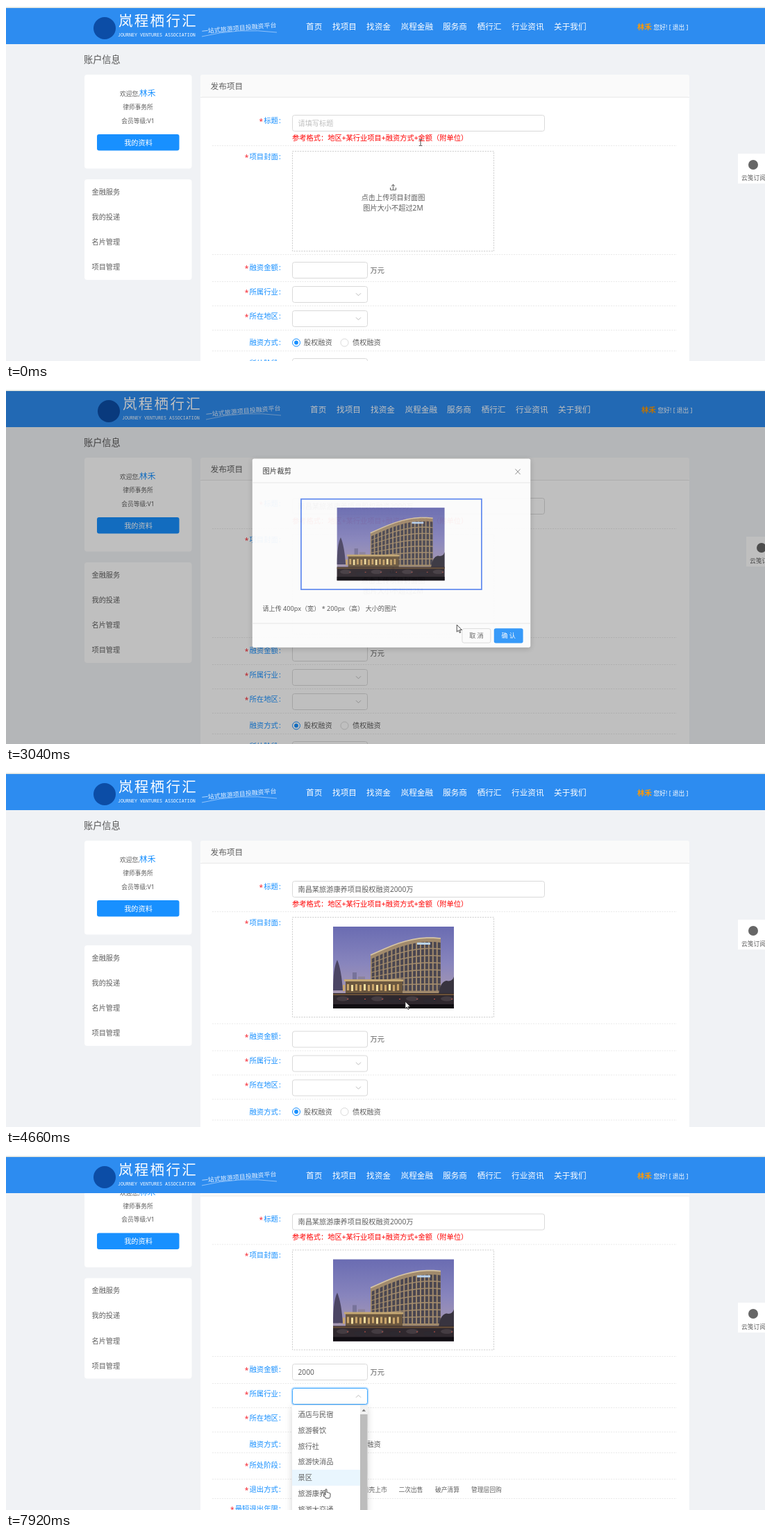
Recreate the animation shown at these times as an HTML page. Size 1093 px wide and 512 px high, loop 8 s.

```html
<!DOCTYPE html>
<html lang="zh-CN">
<head>
<meta charset="utf-8">
<title>发布项目</title>
<style>
html, body { margin: 0; width: 100%; height: 100%; overflow: hidden; background: #f0f2f5; }
svg { display: block; width: 1093px; height: 512px; }
text { font-family: "Noto Sans", "Noto Sans CJK SC", "Noto Sans CJK", sans-serif; white-space: pre; }
.mono { font-family: "Noto Sans Mono", "DejaVu Sans Mono", monospace; }
.shadow { filter: drop-shadow(0 2px 5px rgba(0,0,0,.18)); }
</style>
</head>
<body>
<svg id="stage" viewBox="0 0 1093 512"></svg>
<script>
const LOOP = 8000;
const BLUE = '#1890ff', GREY = '#5f5f5f', LINE = '#d9d9d9';
const SCROLL = 72.5, GROW = 4.5;

// ---- drawing helpers: text is placed by its vertical centre ----
const text = (x, cy, s, size = 10.2, fill = GREY, more = '') =>
  `<text x="${x}" y="${(cy + size * 0.365).toFixed(2)}" font-size="${size}" fill="${fill}" ${more}>${s}</text>`;
const mid = 'text-anchor="middle"', end = 'text-anchor="end"';
const rect = (x, y, w, h, fill, more = '') =>
  `<rect x="${x}" y="${y}" width="${w}" height="${h}" fill="${fill}" ${more}/>`;
const line = (d, stroke = LINE, width = 1, more = '') =>
  `<path d="${d}" fill="none" stroke="${stroke}" stroke-width="${width}" ${more}/>`;
const group = (id, body) => `<g id="${id}">${body}</g>`;
const rule = y => line(`M297 ${y + .5}H966`, '#e9e9e9', 1, 'stroke-dasharray="2 1.5"');
const label = (cy, s, must = true) =>
  text(392, cy, s, 10.4, BLUE, end) + text(393, cy, ':', 10.4, BLUE) +
  (must ? text(391 - s.length * 10.4, cy + 1, '*', 10.2, '#f5222d', end) : '');
const field = (x, y, w, h, id) =>
  (id ? rect(x - .5, y - .5, w + 1, h + 1, 'none', `id="${id}Glow" rx="3.5" stroke="${BLUE}" stroke-opacity=".25" stroke-width="3"`) : '') +
  rect(x, y, w, h, '#fff', `rx="3" stroke="${LINE}" ${id ? `id="${id}"` : ''}`);
const chevron = (x, y, k = 1, r = 3.5) =>
  line(`M${x - r} ${y - k * r / 2}L${x} ${y + k * r / 2}L${x + r} ${y - k * r / 2}`, '#b5b5b5', .9);
const select = (y, id) => field(412.5, y + .5, 108, 23, id) +
  (id ? group('down', chevron(507.5, y + 12)) + group('up', chevron(507.5, y + 12, -1)) : chevron(507.5, y + 12));

// ---- photo: dusk sky, curved building, street ----
function photo() {
  const roof = u => 41 - 25 * Math.sin(u * 1.85), px = u => 54 + 101 * u;
  let edge = '', panes = '';
  for (let i = 0; i <= 10; i++) edge += `L${px(i / 10)} ${roof(i / 10).toFixed(1)}`;
  const cols = 17, rows = 7;
  for (let c = 0; c < cols; c++) for (let r = 0; r < rows; r++) {
    const u = (c + .28) / cols, v = (c + .95) / cols;
    const at = (w, k) => (roof(w) + 6 + (88 - roof(w)) * k / rows).toFixed(1);
    panes += `M${px(u)} ${at(u, r)}L${px(v)} ${at(v, r)}V${at(v, r + .84)}L${px(u)} ${at(u, r + .84)}Z`;
  }
  let lamps = '', cars = '';
  for (let i = 0; i < 15; i++) lamps += rect(8 + i * 6, 83 + (i % 2), 3, 9, i % 3 ? '#c9a56a' : '#f3dc9c');
  for (let i = 0; i < 7; i++) cars += `<ellipse cx="${14 + i * 25}" cy="${104 + i % 2 * 3}" rx="9" ry="3.5" fill="${i % 2 ? '#2d2930' : '#443c42'}"/>` +
    rect(20 + i * 25, 104, 2, 1, '#c8564a');
  return rect(0, 0, 174, 118, 'url(#sky)') +
    rect(28, 66, 6, 20, '#77739a') + rect(36, 72, 10, 14, '#8b829c') +
    `<path d="M54 96${edge}L155 96Z" fill="#a18a6c"/><path d="${panes}" fill="#4a4650"/>` +
    line('M' + edge.slice(1), '#d8c6a4', 1.6) + rect(121, 23, 19, 3, '#b9d4f2') +
    rect(18, 78, 82, 19, '#6b573f') + rect(16, 76, 85, 3, '#c5a873') + lamps +
    `<path d="M0 92Q0 60 6 48Q12 62 14 92Z" fill="#4b4564"/>` +
    `<path d="M152 98Q154 80 163 78Q172 80 174 72V98Z" fill="#38343f"/>` +
    rect(0, 96, 174, 22, '#2f282e') + rect(0, 97, 174, 2, '#6b5138') + cars + rect(0, 112, 174, 6, '#100d12');
}

// ---- page ----
const card = (y, h) => rect(113, y, 154.5, h, '#fff', 'rx="4"');
const side = text(112, 77, '账户信息', 13.2, '#555') + card(99, 135.5) +
  text(164, 127, '欢迎您,', 8.75) + text(192, 126, '林禾', 11.8, BLUE) +
  text(190, 146, '律师事务所', 8.75, GREY, mid) + text(190, 165.5, '会员等级:V1', 8.75, GREY, mid) +
  rect(131, 185, 118.5, 23.5, BLUE, 'rx="3"') + text(190.5, 197, '我的资料', 10.2, '#fff', mid) +
  card(250, 145) + ['金融服务', '我的投递', '名片管理', '项目管理'].map((s, i) => text(123.5, 268 + i * 36.2, s)).join('');

const head = rect(280, 99, 704, 900, '#fff', 'rx="4"') + rect(280, 99, 704, 32, '#fafafa', 'rx="4"') +
  line('M280 131.5H984', '#e8e8e8') + text(294.5, 115.5, '发布项目', 11.65) +
  label(165, '标题') + field(412.5, 157.5, 363, 23, 'title') +
  text(420.5, 169, '请填写标题', 10.2, '#bfbfbf', 'id="hint"') +
  text(420.5, 169, '南昌某旅游康养项目股权融资2000万', 10.2, GREY, 'id="typed"') +
  line('M0 163.5V175', '#333', 1, 'id="caret1"') +
  text(412, 190.5, '参考格式：地区+某行业项目+融资方式+金额（附单位）', 10.25, '#f00') + rule(201) +
  label(217, '项目封面') + rect(412.5, 209.5, 290, 144, '#fff', 'stroke="#ccc" stroke-dasharray="2 1.6"') +
  group('prompt', line('M557.5 265V257.5M555 260L557.5 257.3L560 260M553.5 262V265.3H561.5V262', '#555', .9) +
    text(557.5, 276, '点击上传项目封面图', 10.2, GREY, mid) + text(557.5, 291, '图片大小不超过2M', 10.2, GREY, mid)) +
  '<use id="cover" href="#photo" x="471" y="223"/>';

const radio = (x, cy, on) => `<circle cx="${x}" cy="${cy}" r="5.5" fill="#fff" stroke="${on ? BLUE : LINE}"/>` +
  (on ? `<circle cx="${x}" cy="${cy}" r="2.9" fill="${BLUE}"/>` : '');
const exits = [[417.5, '首次公开发行'], [487.5, '买壳或借壳上市'], [565.5, '二次出售'], [618, '破产清算'], [670, '管理层回购']];
const rest = rule(358) + label(377, '融资金额') + field(412.5, 369.5, 108, 23, 'sum') +
  group('spin', line('M504.5 370V392M505 381.5H520') + chevron(512.5, 376.5, -1, 2) + chevron(512.5, 387, 1, 2)) +
  text(420.5, 381, '', 10.2, GREY, 'id="amount"') + line('M0 375.5V387.5', '#333', 1, 'id="caret2"') +
  text(524.5, 381, '万元') + rule(397) +
  label(412, '所属行业') + select(404, 'trade') + rule(432) +
  label(447, '所在地区') + select(439) + rule(467) +
  label(485.5, '融资方式', false) + radio(418, 485.5, true) + text(429, 485.5, '股权融资') +
  radio(487.5, 485.5) + text(499, 485.5, '债权融资') + rule(497) +
  label(515.5, '所处阶段') + select(508) + rule(535) +
  label(550.5, '退出方式') + exits.map(([x, s]) => text(x, 551, s, 8.75)).join('') + rule(563) +
  label(578, '最短退出年限') + select(570);

const trades = ['酒店与民宿', '旅游餐饮', '旅行社', '旅游快消品', '景区', '旅游康养', '旅游大交通'];
const menu = rect(412, 361, 108.5, 170, '#fff', 'rx="3" class="shadow"') +
  rect(412, 0, 98, 23, '#e9f6fe', 'id="hover"') +
  trades.map((s, i) => text(420.5, 374 + i * 22.9, s)).join('') +
  rect(510, 361, 10.5, 151, '#f1f1f1') + rect(510, 374, 10.5, 138, '#bcbcbc') +
  '<path d="M512.5 369.8L515.2 366.5L518 369.8Z" fill="#777"/>';

// ---- header ----
const nav = [[432, '首页'], [470, '找项目'], [519, '找资金'], [568.5, '岚程金融'], [629, '服务商'], [678.5, '栖行汇'], [728, '行业资讯'], [789, '关于我们']];
const bar = '<circle cx="142" cy="32" r="16" fill="#0c4da6"/>' +
  text(162, 22, '岚程栖行汇', 20.5, '#fff', 'font-weight="500" letter-spacing="2.3"') +
  text(161, 41.5, 'JOURNEY VENTURES ASSOCIATION', 6.67, '#fff', 'class="mono"') +
  `<g transform="rotate(-5 282 38)">${text(282, 36.5, '一站式旅游项目投融资平台', 9, '#e4f0ff')}</g>` +
  line('M282 44Q335 31 390 38', '#a9d0fb', .8) +
  nav.map(([x, s]) => text(x, 30, s, 11.65, '#fff', 'font-weight="500"')).join('') +
  text(909, 30, '林禾', 10.4, '#ff9900', 'font-weight="700"') +
  text(932.5, 30.5, '您好! [ 退出 ]', 8.75, '#fff', 'font-weight="500"');
const tab = rect(1054, 213, 52, 43, '#fff') + '<circle cx="1076" cy="229" r="7" fill="#666"/>' + text(1059, 247.5, '云笺订阅', 8.75);

// ---- file window and crop window ----
const places = ['快速访问', '桌面', '下载', '文档', '图片', '此电脑', '网络'];
let files = '';
for (let i = 0; i < 8; i++) {
  const x = 440 + i % 4 * 104, y = 136 + (i >> 2) * 108;
  files += (i === 1 ? rect(x, y - 4, 94, 98, '#cce8ff', 'id="picked"') : '') +
    (i === 1 ? `<use href="#photo" transform="translate(${x + 10} ${y + 8}) scale(.425 .5)"/>` : rect(x + 10, y + 8, 74, 56, ['#b9cbe0', '#d8cdb8', '#c3d6c4'][i % 3])) +
    text(x + 47, y + 80, `图片${i + 1}.jpg`, 8.75, '#333', mid);
}
const picker = rect(322.5, 62.5, 547, 351, '#fff', 'stroke="#9aa7b5" class="shadow"') +
  text(332, 73, '打开', 8.75, '#222') + line('M855 69L863 77M863 69L855 77', '#333', .9) +
  rect(380, 85, 330, 17, '#fff', `stroke="${LINE}"`) + text(388, 94, '此电脑 › 图片', 8.75, '#333') +
  rect(718, 85, 142, 17, '#fff', `stroke="${LINE}"`) +
  text(332, 114, '组织 ▾    新建文件夹', 8.75, '#333') + line('M323 124.5H869M425.5 125V360', '#e5e5e5') +
  places.map((s, i) => text(342, 140 + i * 20, s, 8.75, '#333')).join('') + files +
  rect(323, 360, 546, 53, '#f0f0f0') + text(385, 373, '文件名(N):', 8.75, '#333') +
  rect(435, 365, 290, 16, '#fff', `stroke="${LINE}"`) + rect(733, 365, 127, 16, '#fff', `stroke="${LINE}"`) +
  rect(733, 388, 60, 17, '#e1e1e1', 'stroke="#0078d7"') + rect(800, 388, 60, 17, '#e1e1e1', 'stroke="#adadad"') +
  text(763, 396.5, '打开(O)', 8.75, '#222', mid) + text(830, 396.5, '取消', 8.75, '#222', mid);

const crop = rect(330, 75.5, 450, 306, '#fff', 'rx="3" class="shadow"') +
  text(346.5, 95.5, '图片裁剪', 11.65, '#333') + line('M755.5 92.5L763.5 101M763.5 92.5L755.5 101', '#888', 1.1) +
  line('M330 114.5H780M330 342.5H780', '#e8e8e8') +
  rect(408.9, 141, 292, 146.5, '#fff', 'stroke="#5a86f2" stroke-width="1.9"') + '<use href="#photo" x="467" y="155"/>' +
  text(346.5, 318, '请上传 400px（宽） * 200px（高） 大小的图片', 10.25, '#555') +
  rect(669.5, 351, 46, 23, '#fff', `rx="3" stroke="${LINE}"`) + text(692.5, 362.5, '取 消', 10.2, GREY, mid) +
  rect(721, 350.5, 47, 24, '#2f98fd', 'rx="3"') + text(744.5, 362.5, '确 认', 10.2, '#fff', mid + ' font-weight="500"');

// ---- pointers, each with its tip or centre at 0,0 ----
const pointers = group('arrow', '<path d="M0 0V10.2L2.4 8L4 11.6L5.6 10.9L4 7.4H7.2Z" fill="#fff" stroke="#222" stroke-width=".8"/>') +
  group('beam', line('M-2.3 -4.5H-.6L0 -4L.6 -4.5H2.3M0 -4V4M-2.3 4.5H-.6L0 4L.6 4.5H2.3', '#333', .9)) +
  group('hand', '<path d="M-1 .4Q0 -.8 1 .4V4.6Q2.3 4 2.8 5Q4.2 4.6 4.6 5.6Q6 5.4 6 6.8V9.5Q6 11.4 4.6 13H-.4L-3.4 8.6Q-4 7 -2.6 7L-1 8.4Z" fill="#fff" stroke="#222" stroke-width=".8"/>');

document.getElementById('stage').innerHTML =
  `<defs><linearGradient id="sky" x2="0" y2="1"><stop stop-color="#6a6cb2"/><stop offset=".45" stop-color="#8885bd"/><stop offset=".85" stop-color="#aa9ab0"/></linearGradient>${group('photo', photo())}</defs>` +
  rect(0, 0, 1093, 512, '#f0f2f5') +
  group('page', side + head + group('rest', rest)) + group('menu', menu) + group('tab', tab) +
  rect(0, 3, 1093, 52, '#2d8cf0') + group('bar', bar) + rect(0, 3, 1093, 509, '#000', 'id="mask"') +
  rect(0, 0, 1093, 2, '#f7f9f7') + rect(0, 2, 1093, 1, '#d3dad6') +
  group('crop', crop) + group('picker', picker) + group('cursor', pointers);

// ---- motion tables ----
const track = (t, steps) => {
  const i = steps.findIndex(s => s[0] > t);
  if (i === 0) return steps[0].slice(1);
  if (i < 0) return steps[steps.length - 1].slice(1);
  const a = steps[i - 1], b = steps[i], k = (t - a[0]) / (b[0] - a[0]);
  return a.slice(1).map((v, j) => v + (b[j + 1] - v) * k);
};
const path = [[0, 597, 197], [70, 597, 196], [300, 572, 170], [480, 566, 169], [1190, 566, 169], [1640, 574, 280], [2030, 574, 280],
  [2380, 590, 180], [2760, 590, 180], [3040, 649, 340], [3400, 742, 362], [3740, 753, 366], [4000, 753, 366], [4380, 733, 362],
  [4659, 733, 362], [4660, 575, 331], [5000, 560, 325], [5350, 463, 305.5], [6450, 463, 305.5], [6680, 465, 328], [6830, 463, 345],
  [7120, 463, 345], [7400, 468, 462], [7570, 476, 361], [7640, 474, 366], [7910, 461, 482]];
const looks = [[0, 'beam'], [1300, 'arrow'], [1560, 'hand'], [1600, 'arrow'], [3430, 'hand'], [4150, 'arrow'], [5230, 'beam'], [5910, ''], [6450, 'beam'], [6560, 'hand']];
const sums = [[0, ''], [5670, '2'], [6220, '20'], [6300, '200'], [6380, '2000']];
const zoom = [[2880, .2, 0], [2960, .62, .55], [3040, .889, .94], [3120, .975, 1], [3210, 1, 1], [3950, 1, 1], [4030, .8, .75], [4110, .5, .35], [4200, .2, 0]];
const shade = [[2880, 0], [3040, .25], [3200, .55], [3280, .65], [3950, .65], [4110, .4], [4320, 0]];
const fileFade = [[1860, 0], [1950, 1], [2700, 1], [2810, 0]];
const scroll = [[4740, 0], [4820, 25], [4900, 52], [5000, SCROLL]];

const parts = {};
document.querySelectorAll('[id]').forEach(n => parts[n.id] = n);
const show = (id, on) => parts[id].style.display = on ? '' : 'none';
const move = (id, x, y, more = '') => parts[id].setAttribute('transform', `translate(${x} ${y})${more}`);
const within = (t, a, b) => t >= a && t < b;
const last = (t, steps) => steps.filter(s => s[0] <= t).pop()[1];
const focus = (id, on) => {
  show(id + 'Glow', on);
  parts[id].setAttribute('stroke', on ? '#40a9ff' : LINE);
};

function render(t) {
  move('page', 0, -track(t, scroll)[0]);
  const covered = t >= 4000;
  move('rest', 0, covered ? GROW : 0);
  show('prompt', !covered);
  show('cover', covered);

  focus('title', within(t, 240, 1500));
  show('hint', t < 790);
  show('typed', t >= 790);
  show('caret1', within(t, 300, 1500));
  move('caret1', t < 790 ? 420.5 : 586.5, 0);

  const sum = last(t, sums);
  focus('sum', within(t, 5350, 6850));
  show('spin', within(t, 5280, 6600));
  parts.amount.textContent = sum;
  show('caret2', within(t, 5350, 6850));
  move('caret2', 420.5 + sum.length * 5.85, 0);

  const open = track(t, [[6900, 0], [7100, 1]])[0];
  focus('trade', t >= 6850);
  show('down', open < .5);
  show('up', open >= .5);
  show('menu', open > 0);
  parts.menu.style.opacity = open;
  move('menu', 0, 361, ` scale(1 ${.8 + .2 * open}) translate(0 -361)`);

  const [x, y] = track(t, path);
  const row = t > 7380 ? 4 : Math.max(0, Math.floor((y - 362) / 22.9));
  parts.hover.setAttribute('y', 362.3 + row * 22.9);

  const modal = within(t, 2880, 4330);
  move('bar', modal ? 6 : 0, 0);
  move('tab', modal ? 12 : 0, 0);
  parts.mask.style.opacity = track(t, shade)[0];
  const [size, solid] = track(t, zoom);
  show('crop', solid > 0);
  parts.crop.style.opacity = solid;
  move('crop', 555, 302, ` scale(${size}) translate(-555 -302)`);

  const seen = track(t, fileFade)[0];
  show('picker', seen > 0);
  show('picked', t > 2380);
  parts.picker.style.opacity = seen;
  move('picker', 596, 238, ` scale(${.94 + .06 * seen}) translate(-596 -238)`);

  const look = last(t, looks);
  for (const id of ['arrow', 'beam', 'hand']) show(id, id === look);
  move('cursor', x, y);
}

const start = performance.now();
function tick() {
  render((performance.now() - start) % LOOP);
  requestAnimationFrame(tick);
}
render(0);
tick();
</script>
</body>
</html>
```
